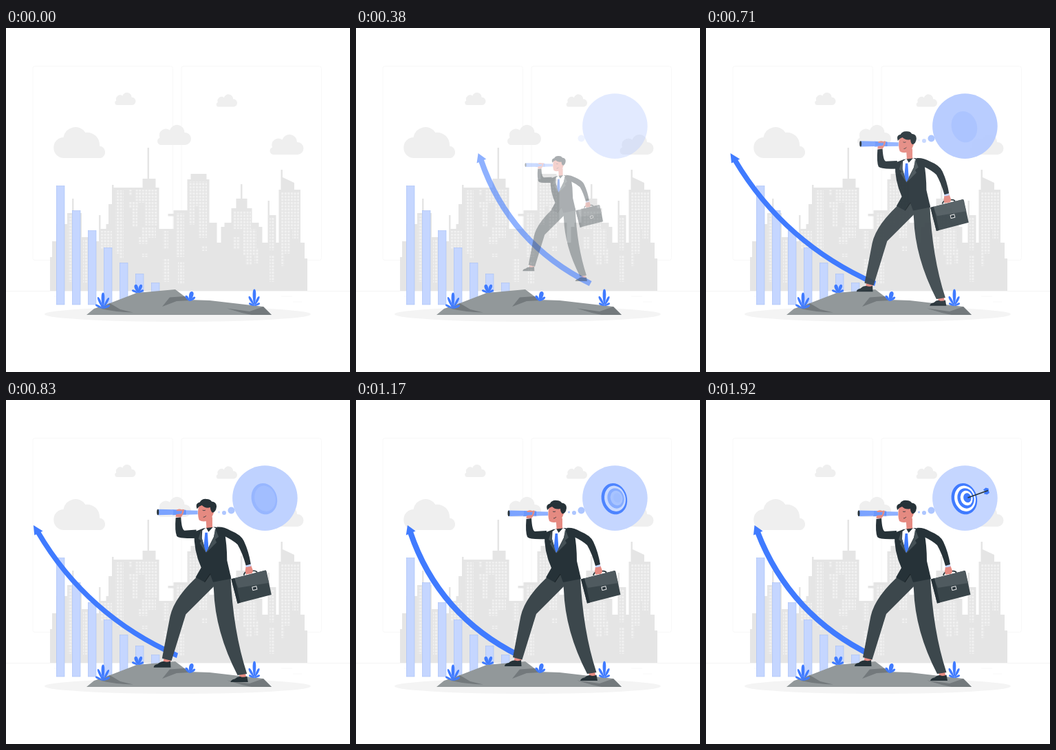
These frames come from a looping animation (500x500 px, 1.96 s). An HTML page:

```html
<!DOCTYPE html>
<html lang="en">
<head>
<meta charset="utf-8">
<title>Business vision</title>
<style>
html, body { margin: 0; width: 100%; height: 100%; overflow: hidden; background: #fff; }
svg { display: block; width: 100vw; height: 100vh; }
</style>
</head>
<body>
<svg viewBox="0 0 500 500">
  <defs>
    <pattern id="panes" width="4.6" height="4.6" patternUnits="userSpaceOnUse">
      <rect width="3" height="3" fill="#f1f1f1"/>
    </pattern>
    <path id="cloud" d="M5.5 29A5.5 5.5 0 0 1 4.5 18.5A9.5 9.5 0 0 1 19 7.5A11 11 0 0 1 40.5 11A9 9 0 0 1 41.5 29Z"/>
    <clipPath id="inBubble"><circle cx="376.400" cy="142.600" r="47.300"/></clipPath>
  </defs>

  <!-- windows and floor -->
  <g fill="none" stroke="#f8f8f8">
    <rect x="39" y="55.5" width="203.500" height="282" rx="3"/>
    <rect x="255" y="55.5" width="203.500" height="282" rx="3"/>
    <path d="M0 382.500H500" stroke="#f5f5f5"/>
    <path d="M400 390h16M417 398h13M70 390h14"/>
  </g>

  <!-- city -->
  <path fill="#e5e5e5" d="M64 382V333h3V310h6V285h16V269h7V248h2.500V269h11.500V304h11V310h14V272h2.500V292h8V285h3.500V256h5V228h2.500V232h42V219h7V174h2.500V219h9.500V232h5V292h21V273.500h-8v-3.500h8V265h20V220h5V212h23V220h4V283h11V312h6V289h5V283h10V262h7V248h6.500V227h2.500V248h7V262h7V283h10V289h5V312h8V251h2.500V272h9.500V312h4V235h3V206h2.500V217L419 225V235h9V312h6V335h4V382Z"/>
  <path fill="url(#panes)" d="M90 272h8v97h-8zM98 272h10v60h-10zM112 308h7v62h-7zM137 295h17v26h-17zM159 236h12v92h-12zM165 326h6v9h-6zM179 235h5v9h-5zM188 235h32v19h-32zM179 253h14v9h-14zM183 262h8v27h-8zM202 254h18v33h-18zM197 290h21v15h-21zM193 304h14v10h-14zM197 328h9v5h-9zM228 295h8v27h-8zM228 335h9v34h-9zM247 269h12v64h-12zM250 340h9v32h-9zM266 223h26v36h-26zM266 259h8v27h-8zM280 259h12v46h-12zM284 317h8v7h-8zM330 266h26v26h-26zM330 304h10v18h-10zM345 292h19v38h-19zM361 320h7v22h-7zM348 331h9v14h-9zM383 275h8v48h-8zM383 331h8v38h-8zM400 238h26v54h-26zM400 292h13v36h-13zM416 292h9v14h-9zM400 328h5v18h-5z"/>
  <g fill="#efefef">
    <path d="M84 189A14.500 15 0 0 1 83.500 159A17.500 17.500 0 0 1 115.500 152A18 18 0 0 1 136 171.500A9 9 0 0 1 138 189Z"/>
    <use href="#cloud" transform="translate(157.500 94)scale(.62)"/>
    <use href="#cloud" transform="translate(305 96.500)scale(.62)"/>
    <use href="#cloud" transform="translate(219 141)"/>
    <use href="#cloud" transform="translate(382.500 155)"/>
  </g>

  <!-- ground -->
  <ellipse cx="249.500" cy="416" rx="193.500" ry="11" fill="#f4f4f4"/>
  <g id="bars" fill="#c5d6ff" stroke="#a5bef6" stroke-width=".6"></g>
  <path fill="#92989a" d="M117 417L128 408L151 400L190 385L246 380L266 395L296 396L374 405L386 417Z"/>
  <path fill="#73797c" d="M138 408L151 400L166 409L185 413.500Q160 413 138 408ZM227 405L238 391.500L259 390L267 396L248 397ZM321 407.500L354 412L374 405L386 417H357L343 414Z"/>
  <g id="plants" fill="#407bff"></g>

  <!-- thought bubble -->
  <g fill="#adc6ff">
    <circle class="dot" cx="327.500" cy="160.500" r="5"/>
    <circle class="dot" cx="317" cy="164" r="3"/>
    <circle class="dot" cx="309.500" cy="163" r="1.500"/>
  </g>
  <circle id="bubble" cx="376.400" cy="142.600" r="47.300"/>
  <use id="ghost" href="#cloud" x="382.500" y="155" fill="#5578c8" clip-path="url(#inBubble)"/>
  <g id="rings"></g>
  <g id="dart">
    <path fill="#407bff" d="M403 130.500L406.500 127.500L410.500 128.500L411 132L405.500 133ZM405 133.500L411 132L412 135L408.500 137.500L404 136.500Z"/>
    <path d="M380.500 142L410 131.500" stroke="#263238" stroke-width="1.700"/>
  </g>

  <g id="growth">
    <path d="M75 192Q121.500 313 241.500 371.500" fill="none" stroke="#407bff" stroke-width="8"/>
    <path d="M70.500 182L82.500 190.500L69 196.500Z" fill="#407bff"/>
  </g>

  <g id="man">
    <g fill="#e58a81">
      <path d="M231 373L241 376L239 382H229ZM338 396L347 395L349 403H340Z"/>
      <path d="M290.500 172H300V185L302 190L295 197L290 190L291.500 186Z"/>
    </g>
    <path fill="#263238" d="M216 387Q216 383 222 382Q226 378 231 378.500Q236 380 240 378L240.500 387ZM326 408Q327 404 332 403.500Q336 399.500 340 400Q345 402 349.500 399.500L351 408Z"/>
    <g fill="#3c474c">
      <path d="M300 255L302 276Q304 336 336 398L349.500 396Q329.500 335 326 255Z"/>
      <path d="M284 252Q246 285 239.500 314L228 374L241.500 377.500L262 311L303 270L302 250Z"/>
    </g>
    <!-- sleeve, jacket and shirt -->
    <path fill="#263238" d="M277 190L260 191Q256 190 255 172L247.500 173Q246 192 249 199Q252 203 277 202Z"/>
    <path fill="#263238" d="M274 193L287 188L304 186L317 190Q321 212 321 234L327 260L301 265L297 254L289 265L276 258L284 244Q273 220 274 193Z"/>
    <path fill="#fff" d="M285.500 191L291 187L294.500 193L301 186L305 188L302 200L291 222L285 202Z"/>
    <path fill="#407bff" d="M289.500 194L293 194L294.500 217L291 222L287.500 216Z"/>
    <path fill="#455156" d="M284 190L280 203L284 206L282 209L291 223L285 203ZM304 188L309 200L304 204L306 208L291 223L302 201Z"/>
    <path d="M297 253L289 265" stroke="#11181b" stroke-width=".7"/>
    <!-- head -->
    <path fill="#e58a81" d="M280.500 156Q278 168 281 176Q286 179.500 293 177Q301 174 303 160L297 151L284 152Z"/>
    <path fill="#263238" d="M278 160Q275 152 282 150.500Q285 145 292 146Q297 146 299 149.500Q306 150 306 157Q305 165 300 165.500Q297 163 297 158Q290 160 285 155Q281 156 278 160Z"/>
    <path d="M286 162q2 1 4 0M287 172q2.500 0 4-2" fill="none" stroke="#263238" stroke-width=".8"/>
    <!-- telescope -->
    <path fill="#8fb1ff" d="M261 162L279 162.500V168L261 168.500Z"/>
    <path fill="#407bff" opacity=".75" d="M243 161L262 161.500V168.500L243 169Z"/>
    <path fill="#7ba3ff" d="M222 160.500L244 161V168.500L222 169Z"/>
    <ellipse cx="222" cy="164.700" rx="1.500" ry="4.200" fill="#263238"/>
    <path fill="#e58a81" d="M247.500 172L248 168L256 167L257 160.500L260 161Q258 169 255 172Z"/>
    <path fill="#e58a81" d="M248 162Q252 159 257 161.500L256 163H249Z"/>
    <!-- briefcase and arm -->
    <path d="M345 255Q346 249 353 250Q362 247 364 251" fill="none" stroke="#263238" stroke-width="1.700"/>
    <path fill="#e58a81" d="M348 242L355 240L358 248Q358 253 354 253L348 253.500L347 249Z"/>
    <path fill="#c5d6ff" d="M347.500 240L354.500 238.500L355.500 242L348.500 243.500Z"/>
    <path fill="#263238" d="M306 186Q316 185 326 191Q341 197 345 206Q352 221 355 239L348 241Q343 223 336 211Q328 204 317 199Z"/>
    <path fill="#39454a" d="M327 260.500L376 248Q377 248 377.500 250L384.500 283L336 295.500Z"/>
    <path fill="#4f5a5f" d="M331 259.500L376 248L381 266L337 273Z"/>
    <path fill="#263238" d="M327 260.500L332 259L340 294.500L336 295.500Z"/>
    <rect x="357.500" y="271.500" width="6" height="4.500" transform="rotate(-14 360 274)" fill="#263238" stroke="#eee"/>
  </g>
</svg>
<script>
const LOOP = 1960, MAN = 1150, ARROW = 1500;
const $ = id => document.getElementById(id);
const clamp = v => Math.max(0, Math.min(1, v));
const ramp = (t, start, length) => clamp((t - start) / length);
const mix = (a, b, p) => a + (b - a) * p;
const fade = (el, p) => el.setAttribute('opacity', clamp(p));

// cubic-bezier(.36, -.01, .5, 1.38): overshoots, then settles
function ease(x) {
  if (x <= 0 || x >= 1) return clamp(x);
  const curve = (a, b, s) => 3 * (1 - s) ** 2 * s * a + 3 * (1 - s) * s * s * b + s ** 3;
  let lo = 0, hi = 1;
  for (let i = 0; i < 24; i++) {
    const mid = (lo + hi) / 2;
    if (curve(.36, .5, mid) < x) lo = mid; else hi = mid;
  }
  return curve(-.01, 1.38, lo);
}

$('bars').innerHTML = [229.5, 265.5, 294.5, 319.5, 341.5, 357.5, 370.5].map((y, i) =>
  `<rect x="${73.3 + 23 * i}" y="${y}" width="11.7" height="${402 - y}"/>`).join('');

// a petal of half-width w from the base (x, y) to its tip at (dx, dy)
function leaf(x, y, dx, dy, w) {
  const l = Math.hypot(dx, dy), turn = Math.atan2(dx, -dy) * 180 / Math.PI;
  const half = k => `C${k * w} ${-l * .3} ${k * w * 1.6} ${-l} 0 ${-l}`;
  return `<path transform="translate(${x} ${y}) rotate(${turn})" d="M0 0${half(1)}L0 0${half(-1)}Z"/>`;
}
const plants = [
  [141, 408, [[0, -23.5, 2.4], [-7.5, -17, 1.8], [8.5, -16, 1.8], [-11, -6, 1.7], [10, -5, 1.7]]],
  [192, 385, [[-4, -12, 2.6], [5, -12, 2.3], [-9, -4, 1.6], [8, -4, 1.6]]],
  [267, 397, [[3.5, -14, 3.2], [-6, -8, 2], [8, -6, 1.8]]],
  [361, 404, [[0, -24.5, 2.4], [-8, -14, 1.8], [7, -14, 1.8], [-8, -4, 1.5], [8, -4, 1.5]]]
];
$('plants').innerHTML = plants.map(([x, y, leaves]) =>
  leaves.map(args => leaf(x, y, ...args)).join('')).join('');

$('rings').innerHTML = [18.5, 15.2, 12, 8.8, 5.6].map((r, i) => {
  const x = 375.4 + i * 1.1, y = 143.6 - i * .35;
  return `<ellipse cx="${x}" cy="${y}" rx="${r}" ry="${r * 1.24}" transform="rotate(-15 ${x} ${y})" fill="${i % 2 ? '#fff' : '#407bff'}"/>`;
}).join('');
const rings = [...$('rings').children];
const dots = [...document.querySelectorAll('.dot')];

function drawArrow(t) {
  const f = t / ARROW, p = ease(f / .6);
  const skew = f < .6 ? mix(-20, 10, p)
    : f < .8 ? mix(10, -2, ease((f - .6) / .2))
    : mix(-2, 0, ease((f - .8) / .2));
  $('growth').setAttribute('transform',
    `translate(${250 * (1 - p)} 277) skewX(${skew}) translate(0 -277)`);
  fade($('growth'), p);
}

function draw(t) {
  const p = ease(t / MAN);
  $('man').setAttribute('transform', `translate(302 277) scale(${.5 + .5 * p}) translate(-302 -277)`);
  fade($('man'), p);
  drawArrow(t);

  const pale = ramp(t, 710, 190);
  $('bubble').setAttribute('fill', `rgb(${mix(181, 197, pale)},${mix(202, 214, pale)},255)`);
  fade($('bubble'), p);
  fade($('ghost'), .15 * ramp(t, 130, 250) * (1 - ramp(t, 540, 150)));
  dots.forEach((dot, i) => fade(dot, ramp(t, 300 + 160 * i, 380)));
  rings.forEach((ring, i) => fade(ring, ramp(t, 650 + 120 * i, 580)));
  fade($('dart'), ramp(t, 1180, 720));
}

const start = performance.now();
function tick() {
  draw((performance.now() - start) % LOOP);
  requestAnimationFrame(tick);
}
tick();
</script>
</body>
</html>
```
